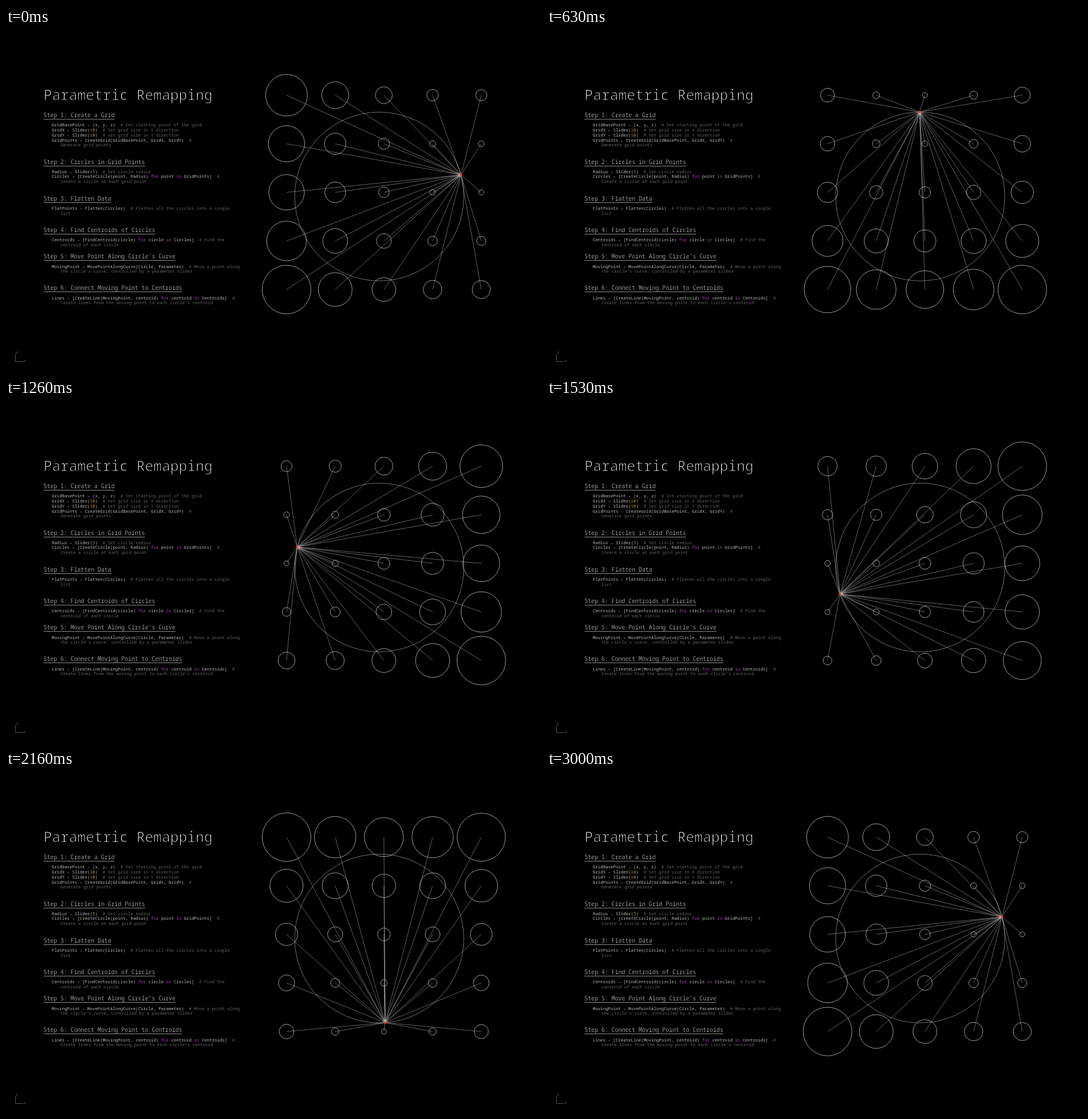
Write an HTML page with a canvas that moves like this. It is 934 px wide and 600 px high and loops after 3030 ms.

```html
<!DOCTYPE html>
<html lang="en">
<head>
<meta charset="utf-8">
<title>Parametric Remapping</title>
<style>
html, body { margin: 0; width: 100%; height: 100%; overflow: hidden; background: #000; }
body { font-family: "Noto Sans Mono", "DejaVu Sans Mono", monospace; font-weight: 300; color: #bcbcbc; }
canvas { position: absolute; left: 0; top: 0; }
h1, h2, section, .axis { position: absolute; margin: 0; white-space: pre; font-variant-ligatures: none; }
/* A black outline thins the strokes to a light weight. */
h1 { left: 65.5px; top: 101.5px; font-size: 24.6px; line-height: 30px; font-weight: 200; color: #fff;
  -webkit-text-stroke: 1.1px #000; }
h2 { left: 65.5px; font-size: 9.86px; line-height: 12px; font-weight: 300; color: #dcdcdc;
  -webkit-text-stroke: .25px #000;
  text-decoration: underline 1px #8c8c8c; text-underline-offset: 2.5px; text-decoration-skip-ink: none; }
section { left: 80px; font-size: 7.4px; line-height: 8.85px; }
p { margin: 0; padding-left: 15px; text-indent: -15px; }
i { font-style: normal; color: #666; }
b { font-weight: 300; color: #b83fcb; }
u { text-decoration: none; color: #c2944a; }
.axis { font-size: 6px; line-height: 8px; color: #777; }
</style>
</head>
<body>
<canvas id="stage" width="934" height="600"></canvas>
<h1>Parametric Remapping</h1>

<h2 style="top:145.8px">Step 1: Create a Grid</h2>
<section style="top:165px"><p>GridBasePoint – (x, y, z)  <i># Set starting point of the grid</i></p><p>GridX – Slider(<u>10</u>)  <i># Set grid size in X direction</i></p><p>GridY – Slider(<u>10</u>)  <i># Set grid size in Y direction</i></p><p>GridPoints – CreateGrid(GridBasePoint, GridX, GridY)  <i>#<br>Generate grid points</i></p></section>

<h2 style="top:227.8px">Step 2: Circles in Grid Points</h2>
<section style="top:246.6px"><p>Radius – Slider(<u>5</u>)  <i># Set circle radius</i></p><p>Circles – [CreateCircle(point, Radius) <b>for</b> point <b>in</b> GridPoints]  <i>#<br>Create a circle at each grid point</i></p></section>

<h2 style="top:291.8px">Step 3: Flatten Data</h2>
<section style="top:311px"><p>FlatPoints – Flatten(Circles)  <i># Flatten all the circles into a single<br>list</i></p></section>

<h2 style="top:346.8px">Step 4: Find Centroids of Circles</h2>
<section style="top:366.4px"><p>Centroids – [FindCentroid(circle) <b>for</b> circle <b>in</b> Circles]  <i># Find the<br>centroid of each circle</i></p></section>

<h2 style="top:393.3px">Step 5: Move Point Along Circle’s Curve</h2>
<section style="top:412.5px"><p>MovingPoint – MovePointAlongCurve(Circle, Parameter)  <i># Move a point along<br>the circle's curve, controlled by a parameter slider</i></p></section>

<h2 style="top:448.3px">Step 6: Connect Moving Point to Centroids</h2>
<section style="top:467.5px"><p>Lines – [CreateLine(MovingPoint, centroid) <b>for</b> centroid <b>in</b> Centroids]  <i>#<br>Create lines from the moving point to each circle's centroid</i></p></section>

<span class="axis" style="left:17.5px;top:563px">y</span>
<span class="axis" style="left:31px;top:578px">x</span>

<script>
const ctx = document.getElementById("stage").getContext("2d");
const LOOP = 3030, STEP = 30, TURN = 3.6, START = 14.8;
const PATH = { x: 651.6, y: 294.7, r: 147.6 };
const MIN_R = 4.4, MAX_R = 42.5;
const grid = Array.from({ length: 25 }, (_, i) => ({
  x: 489.75 + 85 * (i % 5),
  y: 117.5 + 85 * Math.floor(i / 5)
}));

function circle(x, y, r, color) {
  ctx.beginPath();
  ctx.arc(x, y, r, 0, 2 * Math.PI);
  ctx.strokeStyle = color;
  ctx.stroke();
}

function polyline(color, ...points) {
  ctx.beginPath();
  for (const [x, y] of points) ctx.lineTo(x, y);
  ctx.strokeStyle = color;
  ctx.stroke();
}

function draw(now) {
  const step = Math.floor((now % LOOP) / STEP);
  const angle = (START + TURN * step) * Math.PI / 180;
  const px = PATH.x + PATH.r * Math.cos(angle);
  const py = PATH.y - PATH.r * Math.sin(angle);

  // Radii are remapped linearly from the squared distances.
  const dist = grid.map(c => (c.x - px) ** 2 + (c.y - py) ** 2);
  const near = Math.min(...dist), far = Math.max(...dist);

  ctx.clearRect(0, 0, 934, 600);
  ctx.lineWidth = 1;
  polyline("#555", [16.5, 570], [16.5, 583.5], [30, 583.5]);
  ctx.lineWidth = 0.8;
  circle(PATH.x, PATH.y, PATH.r, "#8c8c8c");
  grid.forEach((c, i) => {
    const r = MIN_R + (MAX_R - MIN_R) * (dist[i] - near) / (far - near);
    circle(c.x, c.y, r, "#c4c4c4");
    polyline("rgba(255,255,255,.48)", [c.x, c.y], [px, py]);
  });

  ctx.fillStyle = "rgba(255,40,40,.88)";
  ctx.beginPath();
  ctx.arc(px, py, 2.4, 0, 2 * Math.PI);
  ctx.fill();
}

const begin = performance.now();
function tick() {
  draw(performance.now() - begin);
  requestAnimationFrame(tick);
}
tick();
</script>
</body>
</html>
```
